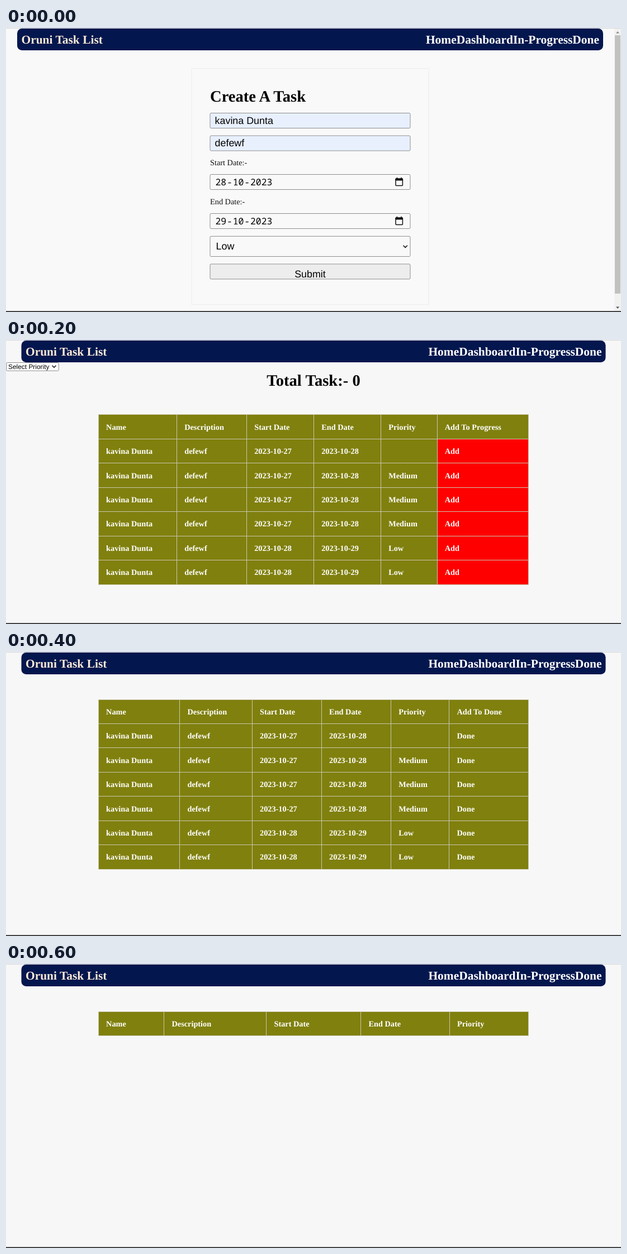
An HTML page that plays this animation: 1100x509 px, repeating every 800 ms.

```html
<!DOCTYPE html>
<html lang="en">
<head>
<meta charset="utf-8">
<title>Task list</title>
<style>
html, body { margin: 0; width: 100%; height: 100%; overflow: hidden; background: #f8f7f8; }
svg { display: block; width: 1100px; height: 509px; }
text { text-rendering: geometricPrecision; }
.serif { font-family: "Liberation Serif", "Times New Roman", serif; }
.sans { font-family: "Liberation Sans", Arial, sans-serif; }
.mono { font-family: "Noto Sans Mono", monospace; }
.bold { font-weight: 700; }
</style>
</head>
<body>
<svg id="stage" viewBox="0 0 1100 509"></svg>
<script>
const stage = document.getElementById('stage');
const PERSON = 'kavina Dunta';
const LOOP = 800;

function add(parent, tag, attrs, content) {
  const el = document.createElementNS('http://www.w3.org/2000/svg', tag);
  for (const key in attrs) el.setAttribute(key, attrs[key]);
  if (content) el.textContent = content;
  return parent.appendChild(el);
}

function box(g, x, y, right, bottom, fill, extra) {
  return add(g, 'rect', { x, y, width: right - x, height: bottom - y, fill, ...extra });
}

function text(g, x, y, size, content, cls, fill = '#000', anchor = 'start') {
  return add(g, 'text', { x, y, 'font-size': size, class: cls, fill, 'text-anchor': anchor }, content);
}

function line(g, d, stroke, width = 1) {
  return add(g, 'path', { d, stroke, 'stroke-width': width, fill: 'none' });
}

function page(bg, left, right) {
  const g = add(stage, 'g', {});
  box(g, 0, 0, 1100, 509, bg);
  box(g, 0, 0, 1100, 1, '#d6d6d8');
  box(g, left, 1, right, 40, '#04164e', { rx: 8.5 });
  text(g, left + 7.5, 27.7, 21.45, 'Oruni Task List', 'serif bold', '#faebd7');
  text(g, right - 7, 27.7, 21.45, 'HomeDashboardIn-ProgressDone', 'serif bold', '#fff', 'end');
  return g;
}

function field(g, y, bottom, fill) {
  box(g, 365, y, 723, bottom, fill, { rx: 2, stroke: '#88888c', 'stroke-width': 0.95 });
}

function dateField(g, y, label, parts) {
  text(g, 365, y - 17, 14.3, label, 'serif', '#111');
  field(g, y, y + 27, '#f9f9f9');
  const xs = [374.4, 395, 405.7, 426.2, 437];
  parts.forEach((part, i) => text(g, xs[i], y + 19.9, 16.4, part, 'mono'));
  box(g, 697, y + 7.7, 709.4, y + 20, 'none', { rx: 1, stroke: '#111', 'stroke-width': 1.5 });
  box(g, 696.5, y + 7, 710, y + 11, '#111', { rx: 1 });
  box(g, 698.6, y + 5.3, 700.2, y + 8, '#111');
  box(g, 706.2, y + 5.3, 707.8, y + 8, '#111');
}

function formPage() {
  const g = page('#f9f9f9', 20, 1068);
  box(g, 332, 72.5, 756, 495.5, '#f9f9f9', { stroke: '#ededed' });
  text(g, 365, 132.4, 28.6, 'Create A Task', 'serif bold');
  field(g, 152.5, 179.5, '#e8f0fe');
  text(g, 373.6, 172, 17.88, PERSON, 'sans');
  field(g, 193, 220, '#e8f0fe');
  text(g, 373.6, 212, 17.88, 'defewf', 'sans');
  dateField(g, 262.5, 'Start Date:-', ['28', '-', '10', '-', '2023']);
  dateField(g, 332.5, 'End Date:-', ['29', '-', '10', '-', '2023']);
  field(g, 373.3, 409.5, '#f9f9f9');
  text(g, 375.6, 397.4, 17.88, 'Low', 'sans');
  line(g, 'M710.5 389.7 l3.7 3.7 l3.7 -3.7', '#111', 1.5);
  field(g, 423, 450, '#ededed');
  text(g, 544, 447.2, 17.88, 'Submit', 'sans', '#000', 'middle');

  box(g, 1088, 1, 1100, 507, '#f1f1f1');
  box(g, 1089, 13, 1099, 476, '#c1c1c1');
  add(g, 'path', { d: 'M1091 9.5 h6 l-3 -3.5 z', fill: '#8a8a8a' });
  add(g, 'path', { d: 'M1091 499.5 h6 l-3 3.5 z', fill: '#555' });
  return g;
}

const HEADS = ['Name', 'Description', 'Start Date', 'End Date', 'Priority'];
const ROW = 43.45;

function taskRows(action) {
  return ['', 'Medium', 'Medium', 'Medium', 'Low', 'Low'].map((level, i) => {
    const day = i < 4 ? 27 : 28;
    return [PERSON, 'defewf', `2023-10-${day}`, `2023-10-${day + 1}`, level, action];
  });
}

function table(g, top, cols, rows, redLast) {
  const edge = '#c9c8ae';
  const snap = v => Math.floor(v) + 0.5;
  const left = snap(cols[0]), right = snap(cols[cols.length - 1]);
  const bottom = snap(top + ROW * rows.length);
  box(g, left, snap(top), right, bottom, '#80800f');
  if (redLast) box(g, snap(cols[cols.length - 2]), snap(top + ROW), right, bottom, '#ff0000');
  for (let i = 0; i <= rows.length; i++) line(g, `M${left} ${snap(top + i * ROW)} H${right}`, edge);
  for (const x of cols) line(g, `M${snap(x)} ${snap(top)} V${bottom}`, edge);
  rows.forEach((row, i) => row.forEach((cell, j) => {
    if (cell) text(g, cols[j] + 13.7, top + i * ROW + 26.7, 14.3, cell, 'serif bold', '#fff');
  }));
}

function listPage() {
  return page('#f8f7f8', 27.5, 1072.5);
}

function dashboardPage() {
  const g = listPage();
  box(g, 0.5, 40.5, 94.3, 55.2, '#fff', { rx: 2, stroke: '#85858a', 'stroke-width': 0.95 });
  text(g, 4, 52.1, 11.92, 'Select Priority', 'sans');
  line(g, 'M82.6 45.8 l3.4 3.4 l3.4 -3.4', '#111', 1.6);
  text(g, 550, 82, 28.6, 'Total Task:- 0', 'serif bold', '#000', 'middle');
  table(g, 133.9, [165.4, 305.5, 430.5, 550.5, 670.5, 771, 934.6],
    [[...HEADS, 'Add To Progress'], ...taskRows('Add')], true);
  return g;
}

function progressPage() {
  const g = listPage();
  table(g, 85, [165.4, 310.8, 440.3, 564.4, 688.5, 792.8, 934.6],
    [[...HEADS, 'Add To Done'], ...taskRows('Done')]);
  return g;
}

function donePage() {
  const g = listPage();
  table(g, 85, [165.4, 282.8, 465.8, 634.7, 793.3, 934.6], [HEADS]);
  return g;
}

const pages = [formPage(), dashboardPage(), progressPage(), donePage()];
box(stage, 0, 507.3, 1100, 509, '#2a2a2c');

// Each page holds an equal share of the loop, with hard cuts.
pages.forEach((g, i) => {
  const steps = pages.map((_, k) => ({
    opacity: k === i ? 1 : 0,
    offset: k / pages.length,
    easing: 'step-end'
  }));
  steps.push({ opacity: i ? 0 : 1, offset: 1 });
  g.setAttribute('opacity', i ? 0 : 1);
  g.animate(steps, { duration: LOOP, iterations: Infinity });
});
</script>
</body>
</html>
```
